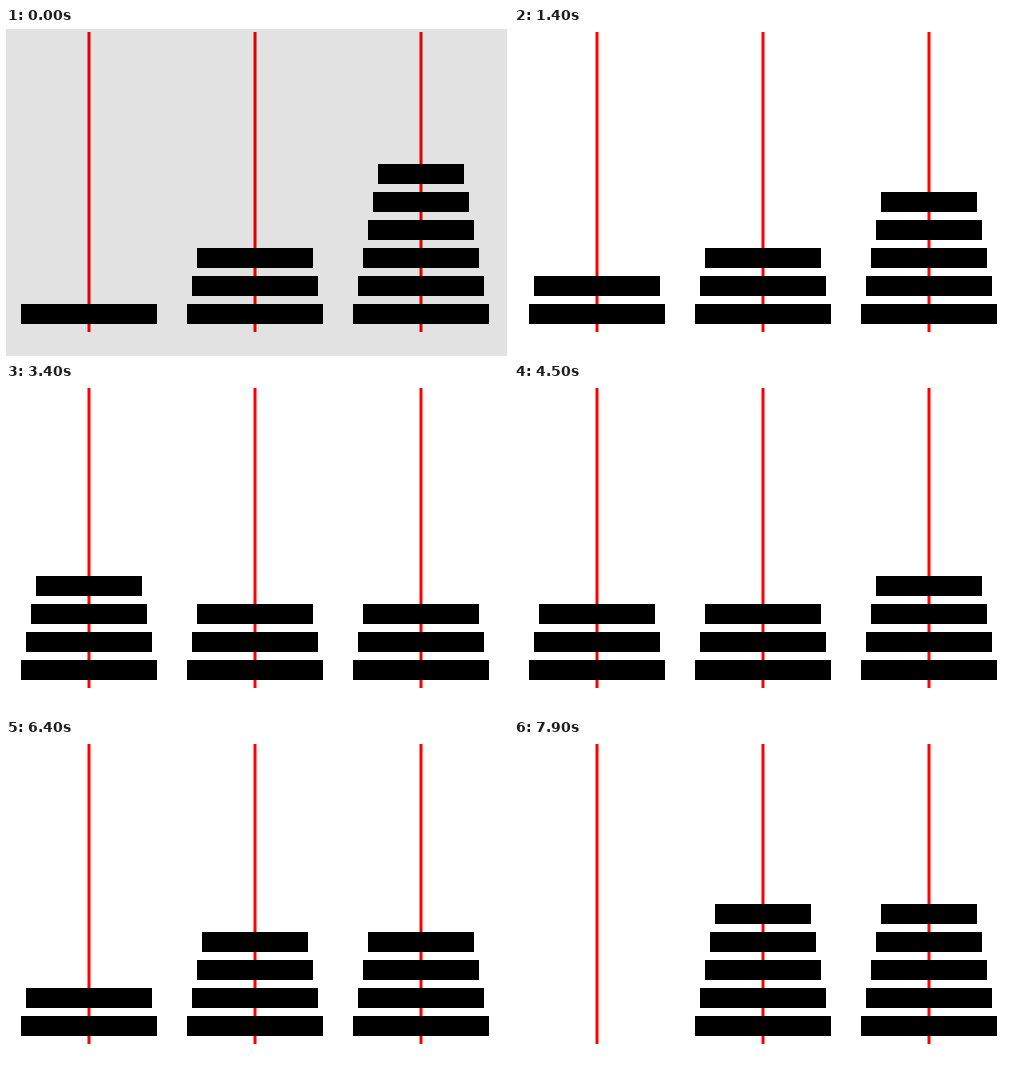
Write an HTML page with a canvas that moves like this. It is 502 by 328 pixels and loops after 8000 ms.

```html
<!DOCTYPE html>
<html lang="en">
<head>
<meta charset="utf-8">
<title>Tower of Hanoi</title>
<style>
  html, body { margin: 0; width: 100%; height: 100%; overflow: hidden; background: #fff; }
  canvas { display: block; }
</style>
</head>
<body>
<canvas id="stage" width="502" height="328"></canvas>
<script>
const ctx = document.getElementById('stage').getContext('2d');
const LOOP = 8000, TICK = 100;
const PEG_X = [83, 249, 415];

// Runs of consecutive ticks that change the picture; one idle tick separates runs.
const RUNS = [4, 2, 3, 3, 3, 2, 3, 3, 3, 3, 2, 3, 3, 2, 3, 3, 3, 2, 3, 3, 3];

// Iterative solution: make the legal move between each pair of pegs in turn.
const PAIRS = [[0, 2], [1, 2], [0, 1]];

function solve(count) {
  const pegs = [[7], [8, 4, 3], [10, 9, 6, 5, 2, 1]];
  const top = i => pegs[i].length ? pegs[i].at(-1) : Infinity;
  const heights = () => pegs.map(p => p.length);
  const states = [heights()];
  for (let move = 0; move < count; move++) {
    const [a, b] = PAIRS[move % 3];
    const [from, to] = top(a) < top(b) ? [a, b] : [b, a];
    pegs[to].push(pegs[from].pop());
    states.push(heights());
  }
  return states;
}

const times = [];
let clock = TICK;
for (const run of RUNS) {
  for (let i = 0; i < run; i++, clock += TICK) times.push(clock);
  clock += TICK;
}

// The first change only lifts the shade; every later one moves a disc.
const states = solve(times.length - 1);

function draw(t) {
  const changes = times.filter(time => time <= t).length;
  const heights = states[Math.max(0, changes - 1)];

  ctx.fillStyle = '#fff';
  ctx.fillRect(0, 0, 502, 328);
  ctx.strokeStyle = '#f00';
  ctx.lineWidth = 3;
  ctx.fillStyle = '#000';
  PEG_X.forEach((x, peg) => {
    ctx.beginPath();
    ctx.moveTo(x, 4);
    ctx.lineTo(x, 304);
    ctx.stroke();
    for (let level = 0; level < heights[peg]; level++) {
      const half = 68 - 5 * level;
      ctx.fillRect(x - half, 276 - 28 * level, 2 * half, 20);
    }
  });

  if (!changes) {
    ctx.fillStyle = 'rgba(0, 0, 0, 0.114)';
    ctx.fillRect(0, 1, 501, 327);
  }
}

const start = performance.now();
function frame() {
  draw((performance.now() - start) % LOOP);
  requestAnimationFrame(frame);
}
frame();
</script>
</body>
</html>
```
